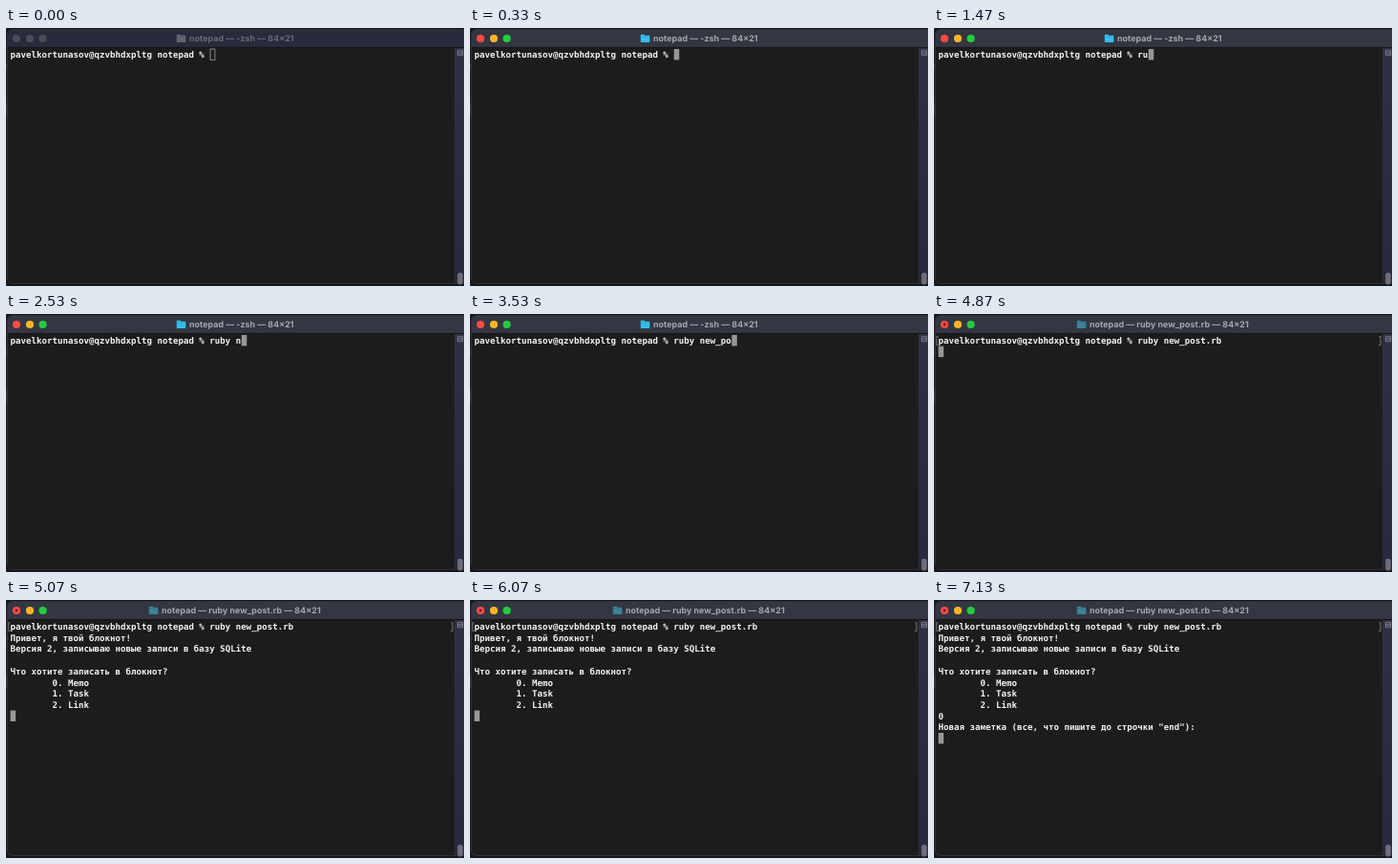
Write an HTML page that moves like this. It is 480x270 px and loops after 8000 ms.

```html
<!DOCTYPE html>
<html lang="ru">
<head>
<meta charset="utf-8">
<title>Terminal</title>
<style>
  html, body { margin: 0; width: 100%; height: 100%; overflow: hidden; background: #15161b; }
  svg { display: block; width: 480px; height: 270px; }
  text { white-space: pre; text-rendering: geometricPrecision; }
  #screen { font: bold 9.15px "DejaVu Sans Mono", monospace; fill: #f2f2f2; }
  #title { font: bold 8.95px Inter, sans-serif; }
</style>
</head>
<body>
<svg viewBox="0 0 480 270">
  <defs>
    <linearGradient id="track" x2="0" y2="1">
      <stop offset="0" stop-color="#2f3140"/>
      <stop offset="1" stop-color="#28293b"/>
    </linearGradient>
  </defs>
  <path d="M0 38h1v5h-1zM0 78h1v14h-1z" fill="#2b2c30"/>
  <rect x="1.5" y="1.5" width="482" height="266" rx="5" fill="#1c1c1c" stroke="#303136"/>
  <path id="bar" d="M2 20V7q0-5 5-5H480V20z"/>
  <path d="M2 20.4H480" stroke="#15161a" stroke-width=".8"/>
  <rect x="470" y="21" width="10" height="246" fill="url(#track)"/>
  <path d="M473.3 23.3h5.4v5.4h-5.4zM473 25.2h6M473 26.9h6" fill="none" stroke="#84868f" stroke-width=".8"/>
  <rect x="473.2" y="256" width="5.6" height="12.5" rx="2.8" fill="#6d6f78"/>
  <g id="lights">
    <circle cx="11" cy="11" r="4.1"/>
    <circle cx="25" cy="11" r="4.1"/>
    <circle cx="38.6" cy="11" r="4.1"/>
  </g>
  <circle id="busy" cx="11" cy="11" r="1.4" fill="#7a1410"/>
  <g id="folder">
    <path d="M0 1q0-1 1-1h2.6l1 1H8.6q1 0 1 1v5.2q0 1-1 1H1q-1 0-1-1z"/>
    <path d="M0 2.4h9.6" stroke="#000" stroke-opacity=".2" stroke-width=".6"/>
  </g>
  <text id="title" y="14.1"></text>
  <path id="marks" d="M4.4 23.5H2.8V32.5H4.4M466.4 23.5H468V32.5H466.4" fill="none" stroke="#85858a" stroke-width=".9"/>
  <rect id="cursor" height="11.4"/>
  <g id="screen"></g>
</svg>
<script>
const LOOP = 8000, LEFT = 4.6, TOP = 22, CELL = 5.505, ROW = 11.7, ROWS = 11;
const FOCUS = 270, ENTER = 4800, RUN = 4870, MENU = 5070, CHOICE = 6400, NOTE = 7070;
const PROMPT = "pavelkortunasov@qzvbhdxpltg notepad % ";
const COMMAND = "ruby new_post.rb";
const KEYS = [1330, 1470, 1600, 1730, 1870, 2530, 2800, 2870,
              3130, 3330, 3530, 3670, 3730, 3870, 4130, 4200];
const GREETING = [
  "Привет, я твой блокнот!",
  "Версия 2, записываю новые записи в базу SQLite",
  "",
  "Что хотите записать в блокнот?",
  ...["0. Memo", "1. Task", "2. Link"].map(s => " ".repeat(8) + s)
];

const $ = id => document.getElementById(id);
const set = (el, attrs) => {
  for (const name in attrs) el.setAttribute(name, attrs[name]);
};
const show = (id, on) => set($(id), { visibility: on ? "visible" : "hidden" });

const rows = Array.from({ length: ROWS }, (_, i) => {
  const row = document.createElementNS("http://www.w3.org/2000/svg", "text");
  set(row, { x: LEFT, y: TOP + 9 + i * ROW });
  return $("screen").appendChild(row);
});

// The last line always holds the cursor.
function linesAt(t) {
  const lines = [PROMPT + COMMAND.slice(0, KEYS.filter(k => k <= t).length)];
  if (t >= MENU) lines.push(...GREETING);
  if (t >= NOTE) lines.push("0", 'Новая заметка (все, что пишите до строчки "end"):');
  if (t >= ENTER) lines.push(t >= CHOICE && t < NOTE ? "0" : "");
  return lines;
}

function draw(t) {
  const active = t >= FOCUS, running = t >= RUN;

  set($("bar"), { fill: active ? "#343641" : "#282b3c" });
  ["#ff4a45", "#fdb528", "#24cc3e"].forEach((color, i) =>
    set($("lights").children[i], { fill: active ? color : "#4a4b56" }));
  show("busy", running);

  const x = running ? 163 : 192;
  $("title").textContent = `notepad — ${running ? COMMAND : "-zsh"} — 84×21`;
  set($("title"), { x, fill: active ? "#a5a6ac" : "#686a72" });
  set($("folder"), {
    transform: `translate(${x - 13.2} 6.8)`,
    fill: running ? "#3a839b" : active ? "#35bff0" : "#63656d"
  });

  const lines = linesAt(t), last = lines.length - 1;
  rows.forEach((row, i) => row.textContent = lines[i] || "");
  show("marks", t >= ENTER);
  set($("cursor"), {
    x: LEFT + lines[last].length * CELL + (active ? 0 : 0.3),
    y: TOP + last * ROW,
    width: active ? 5.5 : 4.8,
    fill: active ? "#979797" : "none",
    stroke: active ? "none" : "#929292",
    "stroke-width": 0.9
  });
}

const start = performance.now();
function tick(now) {
  draw(Math.max(0, now - start) % LOOP);
  requestAnimationFrame(tick);
}
tick(start);
</script>
</body>
</html>
```
